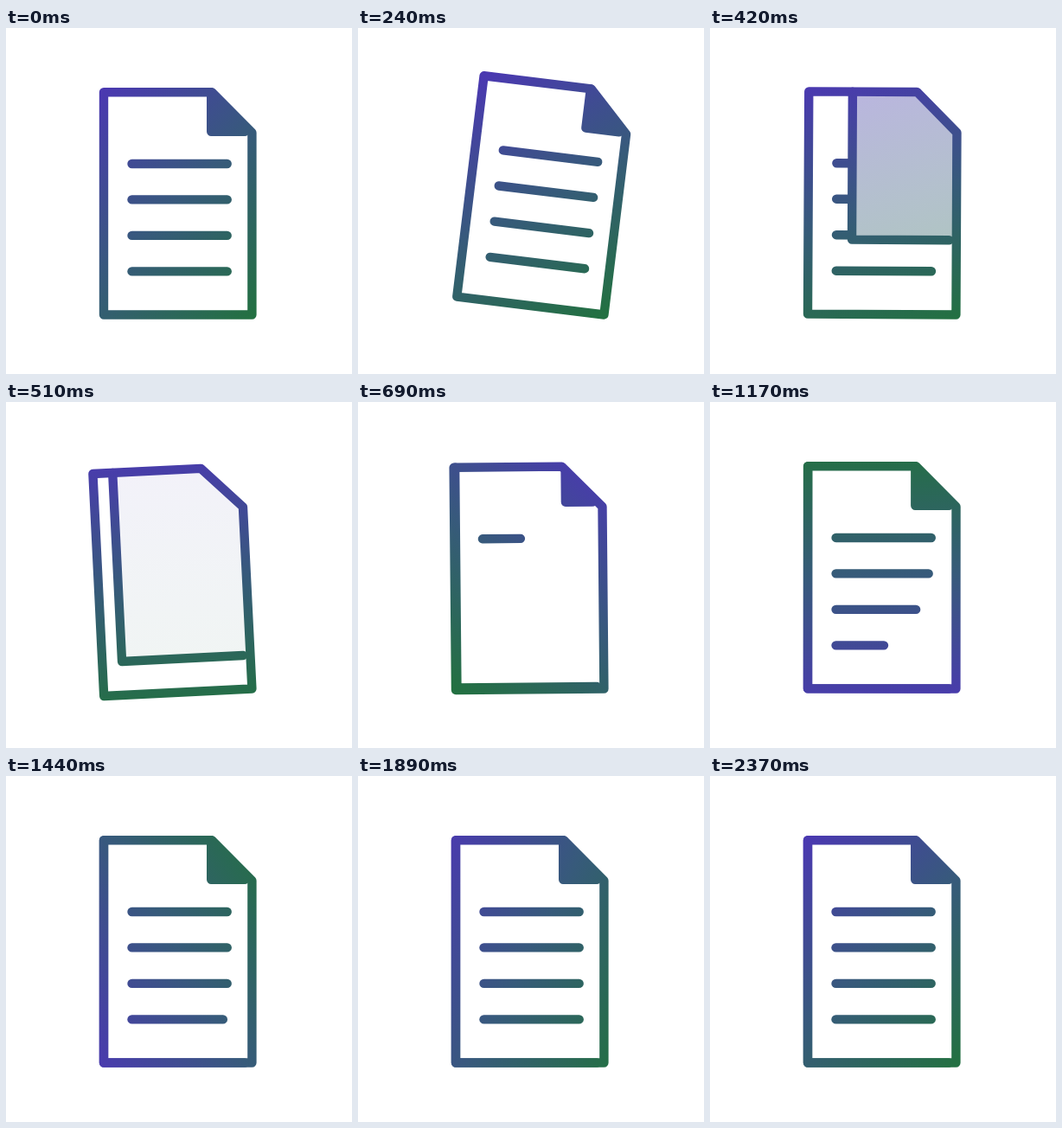
An HTML page for the animation above (5.2 s loop, 400 by 400 pixels).

```html
<!DOCTYPE html>
<html>
<head>
<meta charset="utf-8">
<title>Document page turn</title>
<style>
html, body { margin: 0; width: 100%; height: 100%; overflow: hidden; background: #fff; }
svg { display: block; width: 100vw; height: 100vh; }
</style>
</head>
<body>
<svg viewBox="0 0 400 400">
  <defs>
    <linearGradient id="ink" gradientUnits="userSpaceOnUse">
      <stop offset="0" stop-color="#4a39b0"/>
      <stop offset=".5" stop-color="#375a7b"/>
      <stop offset="1" stop-color="#237042"/>
    </linearGradient>
  </defs>
  <g id="doc" fill="none" stroke="url(#ink)" stroke-width="10.4" stroke-linecap="round" stroke-linejoin="round">
    <g id="lines"></g>
    <path id="sheet" fill="#fff" stroke="none"/>
    <path id="tint" fill="url(#ink)" stroke="none"/>
    <path id="edge"/>
    <path d="M113 74.2H238L284.4 121V331.5H113Z"/>
    <path id="corner" fill="url(#ink)"/>
  </g>
</svg>
<script>
const LOOP = 5200, STEP = 30, TURN_START = 240, REDRAW = 540;
const $ = id => document.getElementById(id);
const set = (el, attrs) => { for (const k in attrs) el.setAttribute(k, attrs[k]); };
const clamp = v => Math.min(1, Math.max(0, v));
const mix = (a, b, p) => a + (b - a) * p;

// Cubic Bezier timing curve, solved by bisection
function bezier(x1, y1, x2, y2) {
  const at = (a, b, s) => 3 * (1 - s) * (1 - s) * s * a + 3 * (1 - s) * s * s * b + s * s * s;
  return p => {
    if (p <= 0) return 0;
    if (p >= 1) return 1;
    let lo = 0, hi = 1;
    for (let i = 0; i < 30; i++) {
      const mid = (lo + hi) / 2;
      if (at(x1, x2, mid) < p) lo = mid; else hi = mid;
    }
    return at(y1, y2, lo);
  };
}
const ease = bezier(.25, .1, .25, 1);
const inOut = bezier(.42, 0, .58, 1);
const spin = bezier(.4, 0, .4, 1);
const progress = (t, start, length) => clamp((t - start) / length);

// Damped swing about the bottom right corner: [time, degrees]
const swing = [[0, 0], [240, 7], [540, -3.05], [840, 2], [1200, 0]];
function tilt(t) {
  for (let i = 1; i < swing.length; i++) {
    const [t0, a] = swing[i - 1], [t1, b] = swing[i];
    if (t < t1) return mix(a, b, inOut((t - t0) / (t1 - t0)));
  }
  return 0;
}

const lines = [157, 198.4, 239.9, 281.4].map(y => {
  const el = document.createElementNS("http://www.w3.org/2000/svg", "path");
  $("lines").appendChild(el);
  return { el, y };
});

function draw(t) {
  set($("doc"), { transform: `rotate(${tilt(t)} 284.4 331.5)` });

  const angle = (45 + 360 * spin(t / 2400)) * Math.PI / 180;
  const dx = 152 * Math.cos(angle), dy = 152 * Math.sin(angle);
  set($("ink"), { x1: 198.7 - dx, y1: 202.8 - dy, x2: 198.7 + dx, y2: 202.8 + dy });

  // The folded corner sweeps across the page and becomes a blank sheet
  const turn = ease(progress(t, TURN_START, 525));
  const x = mix(237.2, 113, turn), y = mix(119.8, 331.5, turn);
  const area = `M${x} 74.2V${y}H284.4V121L238 74.2Z`;
  set($("sheet"), { d: area, visibility: t < REDRAW ? "visible" : "hidden" });
  set($("tint"), { d: area, opacity: 1 - progress(t, TURN_START, 290) });
  set($("edge"), { d: `M${x} 74.2V${y}H276` });

  // A new fold grows out of the cut edge
  const grow = ease(progress(t, REDRAW, 300));
  const fx = mix(261, 237.2, grow), fy = mix(97.5, 119.8, grow);
  set($("corner"), {
    d: `M${fx} ${mix(97.5, 74.2, grow)}V${fy}H${mix(261, 276, grow)}Z`,
    visibility: t > REDRAW ? "visible" : "hidden"
  });

  lines.forEach(({ el, y }, i) => {
    const p = t < REDRAW ? 1 : ease(progress(t, REDRAW + 150 * i, 610));
    set(el, { d: `M145.5 ${y}h${110.2 * p}`, visibility: p > 0 ? "visible" : "hidden" });
  });
}

const begin = performance.now();
function tick() {
  const t = (performance.now() - begin) % LOOP;
  draw(Math.floor(t / STEP) * STEP);
  requestAnimationFrame(tick);
}
draw(0);
requestAnimationFrame(tick);
</script>
</body>
</html>
```
